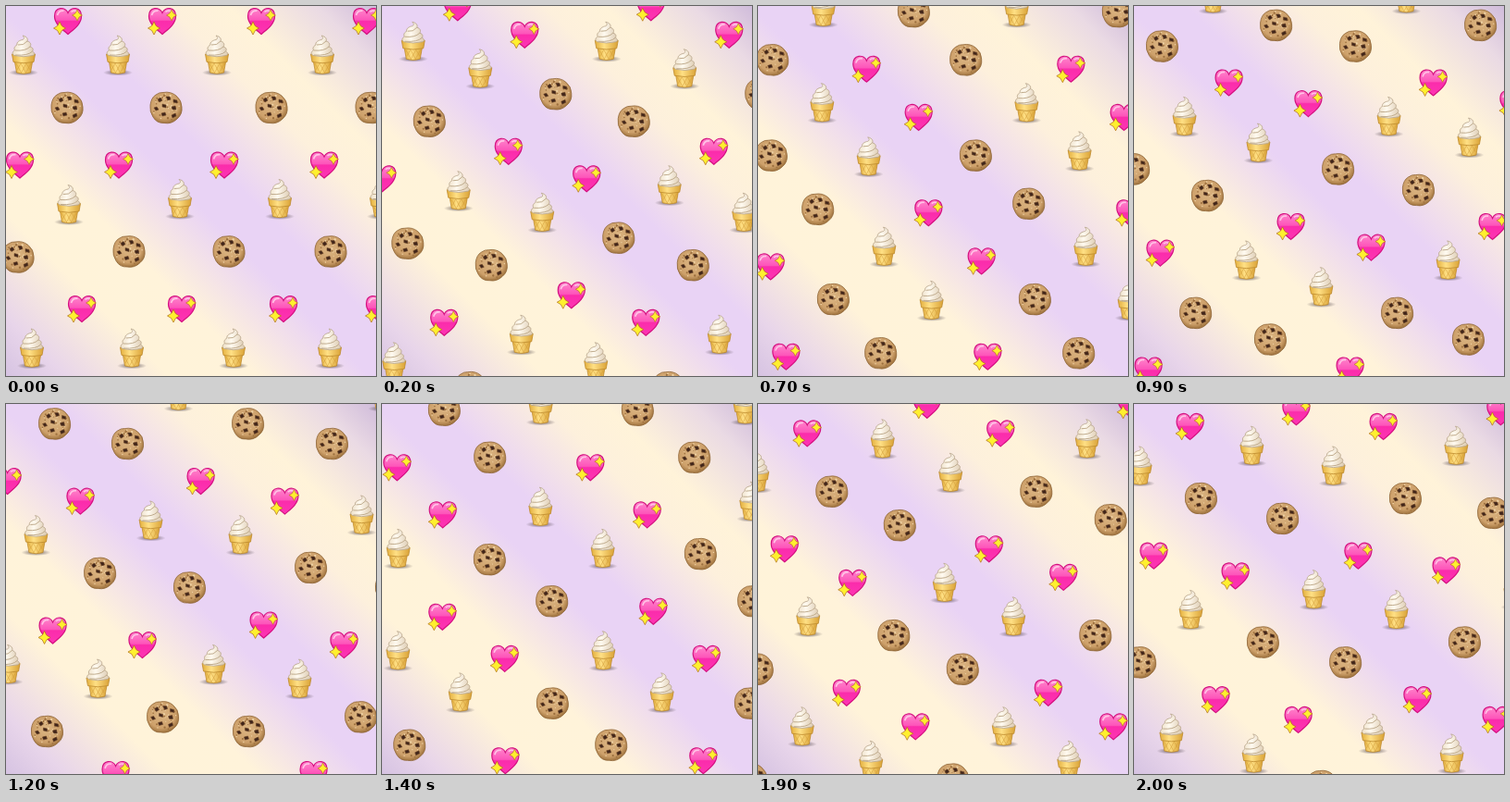
Write an HTML page that moves like this. It is 400 px wide and 400 px high and loops after 2.1 s.

```html
<!DOCTYPE html>
<html lang="en">
<head>
<meta charset="utf-8">
<title>Sweet pattern</title>
<style>
  html, body { margin: 0; width: 100%; height: 100%; overflow: hidden; }
  svg { display: block; width: 100vw; height: 100vh; }
</style>
</head>
<body>
<svg viewBox="0 0 400 400">
  <defs>
    <linearGradient id="sky" gradientUnits="userSpaceOnUse" x1="400" y1="0" x2="0" y2="400">
      <stop offset="0" stop-color="#d0bcdb"/>
      <stop offset=".08" stop-color="#eadae4"/>
      <stop offset=".2" stop-color="#fff3d9"/>
      <stop offset=".28" stop-color="#fdf0dc"/>
      <stop offset=".43" stop-color="#e9d3f5"/>
      <stop offset=".51" stop-color="#e9d3f5"/>
      <stop offset=".66" stop-color="#fff3da"/>
      <stop offset=".78" stop-color="#fff3d9"/>
      <stop offset=".92" stop-color="#e8d5ea"/>
      <stop offset="1" stop-color="#d6c3e2"/>
    </linearGradient>
    <linearGradient id="pink" x2="0" y2="1">
      <stop offset="0" stop-color="#ff86cb"/>
      <stop offset=".45" stop-color="#fd55ba"/>
      <stop offset=".5" stop-color="#fb2cab"/>
      <stop offset="1" stop-color="#fd35b4"/>
    </linearGradient>
    <linearGradient id="cream">
      <stop offset="0" stop-color="#eee0c8"/>
      <stop offset=".4" stop-color="#fffaf0"/>
      <stop offset="1" stop-color="#dccab0"/>
    </linearGradient>
    <linearGradient id="wafer">
      <stop offset="0" stop-color="#e3ae3c"/>
      <stop offset=".4" stop-color="#ffe085"/>
      <stop offset="1" stop-color="#d9a135"/>
    </linearGradient>
    <radialGradient id="dough" cx=".46" cy=".42" r=".58">
      <stop offset="0" stop-color="#dcb684"/>
      <stop offset=".75" stop-color="#cda06a"/>
      <stop offset="1" stop-color="#a0743f"/>
    </radialGradient>
    <radialGradient id="shade">
      <stop offset="0" stop-color="#443a40" stop-opacity=".8"/>
      <stop offset="1" stop-color="#443a40" stop-opacity="0"/>
    </radialGradient>

    <path id="spark" d="M0-7Q1.500-1.500 6.500 0Q1.500 1.500 0 7Q-1.500 1.500-6.500 0Q-1.500-1.500 0-7Z"
      fill="#fff02e" stroke="#b8791a" stroke-width=".8"/>

    <g id="heart">
      <path d="M0 14.500C-5 10-14.500 4-14.500-5C-14.500-15-3-16 0-8.500C3-16 14.500-15 14.500-5C14.500 4 5 10 0 14.500Z"
        fill="url(#pink)" stroke="#d3107f" stroke-width="1.200"/>
      <path d="M-11.500-6Q-10-11.500-4.500-10.800M3.500-9.500Q6-12 10-10" fill="none" stroke="#ffc4e6" stroke-width="1.600"/>
      <use href="#spark" x="-9" y="8"/>
      <use href="#spark" transform="translate(10-6)scale(.84)"/>
    </g>

    <g id="cone">
      <ellipse cy="19" rx="16" ry="3.500" fill="url(#shade)"/>
      <path d="M-10 5H10L7.500 19Q0 21.500-7.500 19Z" fill="url(#wafer)" stroke="#b98528" stroke-width=".7"/>
      <path d="M-8 9L-2 20M-3 9L3 20M3 9L7 16M8 9L2 20M3 9L-3 20M-3 9L-7 16" stroke="#d09a37" stroke-width=".5"/>
      <path d="M-12.500-1H12.500L11 7.500Q0 10-11 7.500Z" fill="url(#wafer)" stroke="#bd8a2c" stroke-width=".8"/>
      <path d="M-1-21C4-20 5-17 4-15C8-14 8.500-11 7-9C11-8 10.500-5 9.500-4C13-2 12 0 10 .500Q0 3-10 .500C-13-1-12-4-9.500-5C-11-8-9-10-7-11C-8-14-4-16-1-16.500C1-17.500 1-19-1-21Z"
        fill="url(#cream)" stroke="#b5a288" stroke-width=".8"/>
      <path d="M-6-11Q0-10 4-15M-9-5Q2-4 7-9M-9 0Q5 1 9.500-4" fill="none" stroke="#b9a484" stroke-width=".9"/>
    </g>

    <g id="cookie">
      <path d="M-3-16.500Q5-18 11-13Q17-8 17-1Q18 7 12 12Q6 18-2 16.500Q-10 17-14 10Q-18 4-17-3Q-16-11-11-14Q-7-17-3-16.500Z"
        fill="url(#dough)" stroke="#8e6537" stroke-width=".8"/>
      <g id="freckles"></g>
      <path d="M-9-9l3-2 2 3-3 2zM0-12l4 0 1 3-3 1zM8-9l4 1 0 3-4-1zM-4-4l4 1 0 3-4-1zM6-1l4-1 1 4-4 0zM-13 0l3-1 2 3-3 1zM-5 6l4-1 1 3-4 1zM6 8l4-2 1 3-4 2z"
        fill="#40251a" stroke="#6b4328" stroke-width=".6"/>
    </g>
  </defs>
  <rect width="400" height="400" fill="url(#sky)"/>
  <g id="falling"></g>
  <g id="rising"></g>
</svg>
<script>
const STEP_MS = 100, STEPS = 21, SPEED = 7.38;
const byId = id => document.getElementById(id);
const use = (name, x, y) => `<use href="#${name}" x="${x}" y="${y}"/>`;

// A strand runs down-left, repeating one cell of three sweets.
const CELL = { x: -154, y: 155.5, first: -1, last: 3, top: 16, seamShift: 6 };
const SWEETS = { heart: [0, 0], cone: [-48, 37], cookie: [-103, 94] };

// Past the heart of the seam cell a strand is nudged further down-left.
function strand(startX, seamCell) {
  let markup = '';
  for (let n = CELL.first; n <= CELL.last; n++) {
    for (const [name, [dx, dy]] of Object.entries(SWEETS)) {
      const nudge = n > seamCell || (n === seamCell && name !== 'heart') ? CELL.seamShift : 0;
      markup += use(name, startX + n * CELL.x + dx - nudge, CELL.top + n * CELL.y + dy + nudge);
    }
  }
  return markup;
}

function seeded(seed) {
  return () => (seed = seed * 16807 % 2147483647) / 2147483647;
}

function freckles(count) {
  const random = seeded(41);
  return Array.from({ length: count }, (_, i) => {
    const angle = random() * Math.PI * 2, r = 15 * Math.sqrt(random());
    const fill = i % 2 ? '#efd3a6' : '#9c6f3e';
    return `<circle cx="${r * Math.cos(angle)}" cy="${r * Math.sin(angle)}" r="${0.5 + random() * 0.7}" fill="${fill}"/>`;
  }).join('');
}

byId('freckles').innerHTML = freckles(44);
const falling = byId('falling'), rising = byId('rising');
falling.innerHTML = [169, 390, 608].map(x => strand(x, 2)).join('');
rising.innerHTML = strand(67, 1) + strand(276, 1) + strand(498, 2) + strand(712, 2);

const start = performance.now();

function draw(now) {
  const step = Math.floor(Math.max(0, now - start) / STEP_MS) % STEPS;
  const d = step * SPEED;
  falling.setAttribute('transform', `translate(${-d} ${d})`);
  rising.setAttribute('transform', `translate(${d} ${-d})`);
  requestAnimationFrame(draw);
}
draw(start);
</script>
</body>
</html>
```
